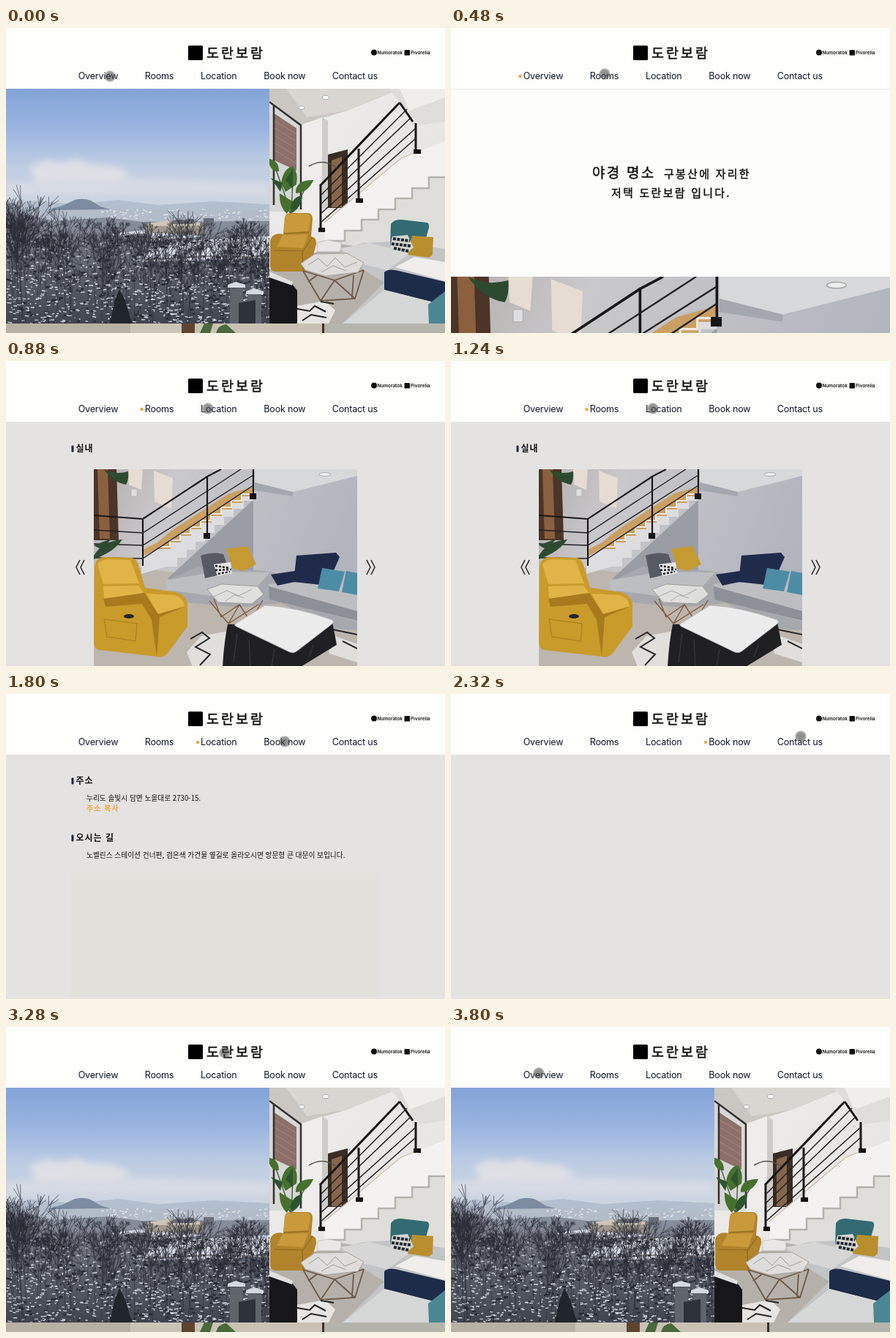
An HTML page for the animation above (3.84 s loop, 600x417 px).

```html
<!DOCTYPE html>
<html lang="ko">
<head>
<meta charset="utf-8">
<style>
html, body { margin: 0; width: 100%; height: 100%; overflow: hidden; background: #fefefd }
svg { display: block; width: 600px; height: 417px; font-family: Inter, "Noto Sans CJK KR", sans-serif; fill: #111 }
.ko { font-family: "Noto Sans CJK KR", "Noto Sans CJK", sans-serif }
.medium { stroke: #111; stroke-width: .4px }
.nav { font-size: 12.6px; letter-spacing: -.22px; fill: #111827 }
.social { font-size: 6.4px; font-weight: 600 }
.intro { font-size: 15px; letter-spacing: .15em }
.head { font-size: 12px; letter-spacing: 1px; font-weight: 700 }
.wide { letter-spacing: 2.6px }
.body { font-size: 9.7px }
.link { font-size: 8px; letter-spacing: 2.9px; fill: #f0a63a; stroke: #f0a63a; stroke-width: .25px }
.line { fill: none }
</style>
</head>
<body>
<svg viewBox="0 0 600 417">
<defs>
  <linearGradient id="sky" x2="0" y2="1">
    <stop stop-color="#83a3d7"/><stop offset=".3" stop-color="#9ab5e0"/>
    <stop offset=".6" stop-color="#c0cee3"/><stop offset="1" stop-color="#d3d8e0"/>
  </linearGradient>
  <linearGradient id="woods" x2="0" y2="1">
    <stop stop-color="#979da9"/><stop offset=".35" stop-color="#6a6e79"/><stop offset="1" stop-color="#40444e"/>
  </linearGradient>
  <linearGradient id="wall" x2="1" y2=".3">
    <stop stop-color="#b3aeac"/><stop offset=".3" stop-color="#c9c8cb"/><stop offset="1" stop-color="#b1b4bd"/>
  </linearGradient>
  <linearGradient id="plaster" x2="1" y2="1"><stop stop-color="#eeedeb"/><stop offset="1" stop-color="#e3e1de"/></linearGradient>
  <radialGradient id="pointer">
    <stop offset=".5" stop-color="#444" stop-opacity=".6"/><stop offset=".85" stop-color="#555" stop-opacity=".5"/>
    <stop offset="1" stop-color="#777" stop-opacity=".15"/>
  </radialGradient>
  <filter id="soft" x="-30%" y="-50%" width="160%" height="200%"><feGaussianBlur stdDeviation="4"/></filter>
  <clipPath id="viewClip"><path d="M0 83h360v321H0z"/></clipPath>
  <clipPath id="loftClip"><path d="M360 83h240v321H360z"/></clipPath>
  <clipPath id="loungeClip"><path d="M0 0h360v270H0z"/></clipPath>

  <g id="lounge" clip-path="url(#loungeClip)">
    <path fill="url(#wall)" d="M0 0h360v270H0z"/>
    <path fill="#d7d8da" d="M220 0h140v9l-88 22-52-13z"/>
    <path fill="#a5a7ae" d="M220 18l52 13v6l-52-8z"/>
    <ellipse cx="316" cy="7" rx="8" ry="2.5" fill="#eee" stroke="#aaa"/>
    <path fill="#4b3428" d="M0 0h31l3 97H0z"/><path fill="#8b603f" d="M5 0h14l3 95H8z"/>
    <path fill="#e6dcd3" d="M47 0h20l-2 28-17-7zM82 2l26 10-2 42-23-10z"/>
    <path fill="#dedee0" stroke="#aaa" stroke-width=".6" d="M51 27h8v10h-8z"/>
    <path fill="#bdb6af" d="M0 125l100 15 160 20 100 55v55H0z"/>
    <path fill="#9b9da5" d="M100 150l118-108v100l-60 18z"/>
    <path fill="#dddde0" d="M218 30v13h-13v11h-14v11h-13v11h-13v11h-13v12h-13v11h-12v11h-13v12h-14l-35 10V112z"/>
    <path fill="#c99f62" d="M218 24v13h-15v9h-14v9h-14v9h-14v9h-14v9h-14v9h-14v9h-14v9H87l-20 10v-9l20-10 14-12 14-10 14-9 14-9 14-9 14-9 14-9z"/>
    <path class="line" stroke="#efe8dc" stroke-width="2" d="M214 34h-12v9h-14v9h-14v9h-14v9h-14v9h-14v9h-14v9h-14v9H90"/>
    <path class="line" stroke="#18181b" stroke-width="2.2" d="M0 63l67 5 88-58 19-10M67 68v64M155 10v82M218 0v38"/>
    <path class="line" stroke="#202024" stroke-width="1.4" d="M0 83l67 4L201 0M0 102l67 2L218 8M0 121l67 1L218 22"/>
    <path fill="#151518" d="M213 33h9v8h-9zM150 87h9v8h-9z"/>
    <path fill="#2d4a31" d="M14 0q15 8 33 3 1 12-3 18Q26 18 14 0zM0 118q12-20 39-22-11 17-39 27zM0 104l24-9-13 15z"/>
    <path fill="#a6a8ad" d="M97 154l45-21 92 6 126 25v56l-30-2-75-35-58 6-80-8z"/>
    <path fill="#bdbec2" d="M97 152l70-12 74 1-18 20-46 14-78-10zM239 157l92-5 29 20v36l-118-31z"/>
    <path fill="#8d9096" d="M239 160l121 34v13l-120-29z"/>
    <path fill="#575a63" d="M146 118q17-6 31-2l9 25-34 8z"/>
    <path fill="#c69a32" d="M181 109l29-4 12 25-18 9-14-3z"/>
    <path fill="#e8e8e8" d="M164 130l23-3 2 15-20 4z"/>
    <path class="line" stroke="#1d1d20" stroke-width="2.5" stroke-dasharray="3 2" d="M166 132l20 3M166 138l22-1M170 143l16-3"/>
    <path fill="#202b4c" d="M277 118l54-4 5 6-17 39-46-5zM242 144l33-5 4 14-28 6z"/>
    <path fill="#4d8ca5" d="M312 135l31 5-8 27-29-4zM345 139l15 3v30l-21-4z"/>
    <path class="line" stroke="#805b3d" stroke-width="1.4" d="M158 180l26 31 41-26M164 177l10 25 25-17 15 23 17-29M184 211l15-26"/>
    <path fill="#dfdfde" stroke="#a09b98" d="M155 164l20-7 49 3 8 11-16 13-46-2z"/>
    <path class="line" stroke="#9e9a99" stroke-width=".8" d="M164 174l18-8 16 7 18-9M180 180l12-8 13 4"/>
    <path fill="#e1dfdb" d="M127 250l20-22 43-8v50h-55zM318 224l42 15v25l-38-12z"/>
    <path class="line" stroke="#27262a" stroke-width="2" d="M132 232l16-9 10 8-19 12 20 10-14 15M360 226l-34-7M340 235l20 10"/>
    <path fill="#202023" d="M183 212q-5 24-7 58h107l49-30-6-31z"/>
    <path class="line" stroke="#3c3b3d" d="M196 224l-5 40M212 233l2 36M247 246l-4 24M300 240l-6 17"/>
    <path fill="#edecec" stroke="#b9b7b7" d="M194 211l40-25q42 2 92 20 3 3-1 6l-48 37q-4 3-9 1l-73-35q-4-2-1-4z"/>
    <path fill="#c99b2b" d="M1 134q2-15 16-14l35 1q8 2 10 13l8 28 42 6q14 4 16 17v30l-26 35q-6 9-17 6l-78-9q-7-1-7-14z"/>
    <path fill="#e0b446" d="M5 130q5-7 15-7l30 1 12 32-49 1zM13 160l48-1 9 12-56 6zM72 170l38 2q12 3 14 15l-36 11z"/>
    <path fill="#a77a1d" d="M13 177l56-8 19 29 36-10-34 14-4 54-7-50-13-22-50 4z"/>
    <path class="line" stroke="#a77b20" d="M14 205l45 6-2 24-39-6z"/>
    <ellipse cx="48" cy="201" rx="7" ry="3" fill="#24242a"/>
  </g>
</defs>

<g data-page="home">
  <g clip-path="url(#viewClip)">
    <path fill="url(#sky)" d="M0 83h360v180H0z"/>
    <g filter="url(#soft)" fill="#e6e4e7">
      <path d="M32 190l22-9 22 3 22-5 16 7 36 3 20 12-20 7-110 3z" opacity=".8"/>
      <path d="M0 212l150-8 210 8v16H0z" opacity=".45"/>
    </g>
    <path fill="#b3bfcf" d="M0 240l38-4 55 5 60-6 55 7 75-5 77 4v25H0z"/>
    <path fill="#7d8ba1" d="M52 250l25-7 17-8q12-3 22 1l13 8 24 7z"/>
    <path fill="#b3bcc9" d="M0 250l130-2 230 2v30H0z"/>
    <path id="city" class="line" stroke="#dfe4ea" stroke-width="1.5"/>
    <path fill="#858d9b" d="M60 264l80-5 46 6 174-1v40H60z"/>
    <path fill="url(#woods)" d="M0 253l50 7 55 13 95-4 80 5 80-6v136H0z"/>
    <path fill="#d9dfe8" d="M190 306l45-14 125-8v24l-45 8-129 4zM140 282l50-6 85 9-80 6z"/>
    <path fill="#a0988d" d="M190 268l31-4 50 4v14l-80-2z"/><path fill="#cfc5b8" d="M194 267l34-5 37 4v4l-70 1z"/>
    <path fill="#6a6e78" d="M228 263l28-2v7h-28zM270 260h14v10h-14zM166 283l30-3 4 9-34 3z"/>
    <path class="line" stroke="#8b857f" stroke-width="2" d="M190 317l80-5 90 2"/>
    <path id="gaps" class="line" stroke="#262a33" stroke-width="2.5"/>
    <path id="specks" class="line" stroke="#c9d1de" stroke-width="1.5"/>
    <path id="trees" class="line" stroke="#2a2d36" stroke-width=".6"/>
    <path id="snow" class="line" stroke="#dfe5ee" stroke-width="1.1"/>
    <path fill="#20262b" d="M142 404l6-30 7-17 8 15 9 32z"/>
    <path fill="#5f646d" d="M306 356h18v48h-18zM331 364h18v40h-18z"/>
    <path fill="#d5dae2" d="M303 351l11-4 13 4v4h-24zM328 360l11-4 13 4v4h-24z"/>
    <path fill="#2d323b" d="M318 376l23-4v32h-23z"/>
  </g>

  <g clip-path="url(#loftClip)">
    <path fill="url(#plaster)" d="M360 83h240v321H360z"/>
    <path fill="#cac7c2" d="M360 83h180l-74 30-63 19-43-28z"/>
    <path fill="#d9d6d1" d="M383 83h157l-74 30-55 9z"/>
    <g fill="#fff" stroke="#aaa"><ellipse cx="437" cy="95" rx="4.5" ry="2.8"/><ellipse cx="404" cy="109" rx="4" ry="2.5"/></g>
    <path fill="#d6d8d7" d="M360 98l43 34v119h-43z"/><path fill="#8c7069" d="M367 117l30 20v58l-30-14z"/>
    <path class="line" stroke="#b09992" stroke-width=".6" d="M367 127l30 18m-30-8l30 18m-30-8l30 18m-30-8l30 18m-30-8l30 18"/>
    <path class="line" stroke="#34302e" stroke-width="2.5" d="M360 101l43 32v115M366 105v137"/>
    <path fill="#eeedeb" d="M405 132l27-10v140h-27z"/><path fill="#cfccc7" d="M432 122l8 5v120h-8z"/>
    <path fill="#3a2c25" d="M440 173l27-7v80h-27z"/><path fill="#86664a" d="M445 181l14-5v69h-14z"/>
    <path fill="#deddda" d="M490 240l110-50v150H450l-5-50z"/>
    <path fill="#dfddda" d="M523 83h77v45l-35 5z"/><path fill="#f0eeeb" d="M538 83h62v12l-49 18z"/>
    <path fill="#f3f2f0" d="M600 155l-32 12-28 11-105 89v24h28v-14h23v-15h23v-14h23v-15h23v-14h23v-15h22z"/>
    <path class="line" stroke="#b5b2ae" stroke-width="2.5" d="M440 291h23v-14h23v-15h23v-14h23v-15h23v-14h23v-15h22"/>
    <path class="line" stroke="#cdbca6" stroke-width="1.2" d="M568 167l-28 11-105 88"/>
    <path class="line" stroke="#171717" stroke-width="3" d="M429 216l109-114M430 215v62M482 165v71M538 102l18 26M560 130v40"/>
    <path class="line" stroke="#222" stroke-width="1.5" d="M430 229l118-118M430 241l124-119M430 254l130-117M430 266l130-115"/>
    <path fill="#111" d="M427 273h9v6h-9zM478 233h10v6h-10zM557 166h10v6h-10z"/>
    <path class="line" stroke="#4b633c" stroke-width="1.5" d="M390 254l-23-66M390 254l2-48M390 254l20-36M389 254l-15-26"/>
    <path class="line" stroke="#55514a" stroke-width="1.5" d="M414 189q20-12 38 2"/>
    <path fill="#47702f" d="M360 179q13 2 13 17-9 1-13-9zM376 212q3-20 16-23 8 9 5 25l-15 10zM374 226q-1 18 10 28l9-16zM396 222q3-15 24-14-7 17-24 18z"/>
    <path fill="#2d552d" d="M382 208l10-15v27zM388 247q4-17 17-18-1 16-13 23zM362 205l16 7-3 12z"/>
    <path fill="#b5b0aa" d="M360 330l95-35 145 22v87H360z"/>
    <path fill="#e8e7e5" stroke="#aaa" stroke-width=".6" d="M426 293l14-3 18 3v13h-32z"/>
    <path fill="#b1842b" d="M361 290q4-11 18-8l2-23q1-6 9-6h23q6 1 6 8l-2 24q8 1 7 11l-9 32q-2 5-10 5h-37q-7-1-7-8z"/>
    <path fill="#c89a3c" d="M382 258q2-4 9-4h21q5 1 4 7l-3 17-34 2zM378 283l35-1-7 19-36-2z"/>
    <path class="line" stroke="#8d681f" stroke-width="1.2" d="M380 281l34-2M366 304l40 1 13-19M405 305l1 26"/>
    <path fill="#c3c4c5" d="M455 304l33-10 38-2 74 10v102H460l57-56-32-20z"/>
    <path fill="#d6d6d6" d="M457 301l40-7 56 14-32 23-40-10z"/>
    <path fill="#326b72" d="M526 268q5-7 14-6l35 4q4 1 3 7l-5 18-48 8z"/>
    <path fill="#b88f2c" d="M555 284l29 2-1 24-5 4-29-4z"/>
    <path fill="#d5d5d2" d="M528 285l21-2 8 17-12 10-20-10z"/>
    <path class="line" stroke="#222831" stroke-width="4" stroke-dasharray="4 1.5" d="M529 288l23 3M527 295l26 3M530 301l20 4"/>
    <path fill="#efeeec" d="M532 327l26-14 42 7v26z"/><path fill="#1d2c49" d="M517 334q5-5 15-3l68 16v32l-83-21z"/>
    <path fill="#d6d7d7" d="M460 404l57-46 83 21v25z"/><path fill="#4b8792" d="M577 378l23-18v44h-22z"/>
    <path class="line" stroke="#6f5947" stroke-width="1.8" d="M406 332l24 41 47-3 12-39M406 332l43 13-19 28M489 331l-40 14 28 25M425 338l-12 9M475 338l-2 31"/>
    <path fill="#dedddb" stroke="#a9a39e" d="M403 322l19-13 44-1 23 13-8 13-45 5-27-8z"/>
    <path class="line" stroke="#8e8c8c" stroke-width=".8" d="M413 324l14-9 12 11 11-12 13 13 17-7M431 334l16-9 18 7"/>
    <path fill="#e7e5e2" d="M398 380l38-7 14 13-9 18h-43z"/>
    <path class="line" stroke="#222" stroke-width="2" d="M398 384l17 3 7-7 15 8M405 400l12-8 21 4M430 374l18 3"/>
    <path fill="#171719" d="M360 337l31 13 7 9v45h-38z"/><path fill="#e1e0df" d="M360 333l32 14-1 5-31-11z"/>
  </g>
  <path fill="#b7b1a4" d="M0 404h240v13H0z"/><path fill="#c9c4b6" d="M170 404h70v13h-70z"/>
  <path fill="#5f4531" d="M240 404h27v13h-27z"/><path fill="#c9c2b4" d="M258 404h177v13H258z"/>
  <path fill="#49683b" d="M265 417l6-13h12l-4 13zM287 417q3-11 14-12l13 12z"/>
  <path fill="#b4b4ad" d="M435 404h165v13H435z"/><path fill="#3c302b" d="M432 404h3v13h-3z"/>
</g>

<g data-page="overview">
  <path fill="#fdfdfc" d="M0 83h600v334H0z"/><path fill="#ededeb" d="M0 83h600v1H0z"/>
  <g class="ko intro medium">
    <text x="193" y="205" font-size="19">야경 명소</text><text x="291" y="205">구봉산에 자리한</text>
    <text x="219" y="231">저택 도란보람 입니다.</text>
  </g>
  <use href="#lounge" transform="translate(0 340) scale(1.667)"/>
</g>

<g data-page="rooms">
  <path fill="#e4e3e2" d="M0 83h600v334H0z"/>
  <g class="ko head" data-bar="89.5 115.5"><text x="95.5" y="124">실내</text></g>
  <use href="#lounge" x="120" y="148"/>
  <path class="line" stroke="#222" stroke-width="1.5" d="M101 272l-5 10 5 10M107 272l-5 10 5 10M493 272l5 10-5 10M499 272l5 10-5 10"/>
</g>

<g data-page="location">
  <path fill="#e4e3e2" d="M0 83h600v334H0z"/>
  <path fill="#e3e1db" d="M89 245h422v172H89z"/>
  <g class="ko head" data-bar="89.5 114.5"><text x="95.5" y="123">주소</text></g>
  <g class="ko head" data-bar="89.5 192.5"><text x="95.5" y="201">오시는 길</text></g>
  <g class="ko body">
    <text x="110" y="145.5">누리도 솔빛시 담면 노을대로 2730-15.</text>
    <text x="110" y="160" font-size="10" font-weight="700" letter-spacing="1" fill="#f0a63a">주소 복사</text>
    <text x="110" y="223.5">노벨린스 스테이션 건너편, 검은색 가건물 옆길로 올라오시면 앙문형 큰 대문이 보입니다.</text>
  </g>
</g>

<g data-page="book"><path fill="#e4e3e2" d="M0 83h600v334H0z"/></g>

<g data-page="contact">
  <path fill="#dfdedc" d="M0 83h600v334H0z"/>
  <g class="line" stroke-linecap="round">
    <path stroke="#49372c" stroke-width="5" d="M86 81C85 125 92 135 102 156S109 198 109 218 110 269 109 283 102 313 97 335 90 365 92 382 95 405 95 420"/>
    <path stroke="#806753" stroke-width="1.2" stroke-dasharray="2 2" d="M87 83C86 125 93 135 103 156S110 198 110 218 111 269 110 283 103 313 98 335 91 365 93 382 96 405 96 420"/>
    <path stroke="#5c4737" stroke-width="4" d="M520 420C513 385 519 360 535 341S565 324 589 329"/>
  </g>
  <path fill="#1b1b1c" d="M587 331l13 1v72q-21-7-30-24-4-8-1-23 4-16 18-26z"/>
  <path class="line" stroke="#77726c" stroke-width="1.5" d="M573 352q14 13 27 12M579 342q12 9 21 8M571 371q12 17 29 22"/>
  <g class="ko head wide" data-bar="181 259"><text x="186" y="267.5">전화번호</text></g>
  <g class="ko head wide" data-bar="345.5 259"><text x="351" y="267.5">피보렐리아</text></g>
  <g class="ko head wide" data-bar="181 351"><text x="186" y="360">누모라톡</text></g>
  <g class="ko head wide" data-bar="345.5 351"><text x="351" y="360">하루비노아</text></g>
  <text x="188" y="297.5" font-size="8.5" font-weight="500" letter-spacing="2.4">010-0000-1234</text>
  <g class="ko link"><text x="353" y="297.5">바로가기</text><text x="188" y="389.5">바로가기</text><text x="353" y="389.5">바로가기</text></g>
</g>

<path fill="#fefefd" d="M0 0h600v83H0z"/>
<rect x="249" y="24" width="20" height="20" rx="1.5" fill="#000"/>
<text class="ko medium" x="274" y="41" font-size="18.5" letter-spacing="3">도란보람</text>
<circle cx="503" cy="33.5" r="4"/><rect x="544.5" y="30" width="7.5" height="7.5" rx="1"/>
<g class="social"><text x="507.5" y="36">Numoratok</text><text x="553" y="36">Pivorelia</text></g>
<g class="nav">
  <text x="98.7" y="70">Overview</text><text x="189.7" y="70">Rooms</text><text x="266" y="70">Location</text>
  <text x="352.3" y="70">Book now</text><text x="445.7" y="70">Contact us</text>
</g>
<circle id="dot" r="2.2" cy="66" fill="#f0a63a"/>
<circle id="cursor" r="8" fill="url(#pointer)"/>
</svg>

<script>
const LOOP = 3840;
const byId = id => document.getElementById(id);
let seed = 17;
const rand = (a, b) => a + (b - a) * ((seed = seed * 16807 % 2147483647) / 2147483647);
const fix = n => n.toFixed(1);
const fill = (id, n, make) => byId(id).setAttribute('d', Array.from({ length: n }, make).join(''));
const dash = (x0, x1, y0, y1, width) => () =>
  `M${fix(rand(x0, x1))} ${fix(rand(y0, y1))}l${fix(rand(.8, width))} ${fix(rand(-1, 1))}`;

function branch(x, y, length, angle, depth) {
  const x2 = x + Math.cos(angle) * length, y2 = y + Math.sin(angle) * length;
  let d = `M${fix(x)} ${fix(y)}L${fix(x2)} ${fix(y2)}`;
  if (depth) for (const side of [-1, 0, 1])
    d += branch(x2, y2, length * rand(.4, .7), angle + side * .45 + rand(-.2, .2), depth - 1);
  return d;
}
// Bare trees stand taller at the left edge.
function tree() {
  const x = rand(-5, 362), y = rand(300, 415);
  const top = (x < 40 ? 195 + x : 258) + rand(0, 75);
  return branch(x, y, Math.max(10, (y - top) * .47), -Math.PI / 2 + rand(-.1, .1), 3);
}
fill('city', 90, dash(130, 355, 248, 261, 4));
fill('gaps', 420, dash(0, 360, 285, 404, 6));
fill('specks', 520, dash(0, 360, 292, 404, 6));
fill('trees', 150, tree);
fill('snow', 320, dash(0, 360, 335, 404, 5));

for (const heading of document.querySelectorAll('[data-bar]')) {
  const [x, y] = heading.dataset.bar.split(' ');
  heading.insertAdjacentHTML('afterbegin', `<rect x="${x}" y="${y}" width="3" height="9" rx="1" fill="#1c2544"/>`);
}

// Start time, page, marker position.
const visits = [
  [0, 'home'], [200, 'overview', 94.5], [700, 'rooms', 185.5], [1320, 'location', 262],
  [1960, 'book', 348], [2520, 'contact', 441.5], [3160, 'home']
];
// Time, x, y of the pointer.
const stops = [
  [0, 142, 66], [180, 142, 66], [440, 210, 63], [660, 210, 63], [860, 276, 65], [1320, 276, 65],
  [1700, 381, 65], [1940, 381, 65], [2240, 478, 58], [2640, 478, 58], [3000, 299, 35],
  [3540, 299, 35], [3800, 120, 63], [LOOP, 120, 63]
];
const pages = document.querySelectorAll('[data-page]');
const dot = byId('dot'), cursor = byId('cursor');

function draw(now) {
  const t = now % LOOP;
  const [, page, mark] = visits.findLast(v => v[0] <= t);
  for (const p of pages) p.style.display = p.dataset.page === page ? '' : 'none';
  dot.setAttribute('cx', mark ?? -10);

  const next = stops.findIndex(s => s[0] > t);
  const [t0, x0, y0] = stops[next - 1], [t1, x1, y1] = stops[next];
  const u = (t - t0) / (t1 - t0), ease = u * u * (3 - 2 * u);
  cursor.setAttribute('cx', x0 + (x1 - x0) * ease);
  cursor.setAttribute('cy', y0 + (y1 - y0) * ease);
}
function tick() {
  draw(performance.now());
  requestAnimationFrame(tick);
}
tick();
</script>
</body>
</html>
```
